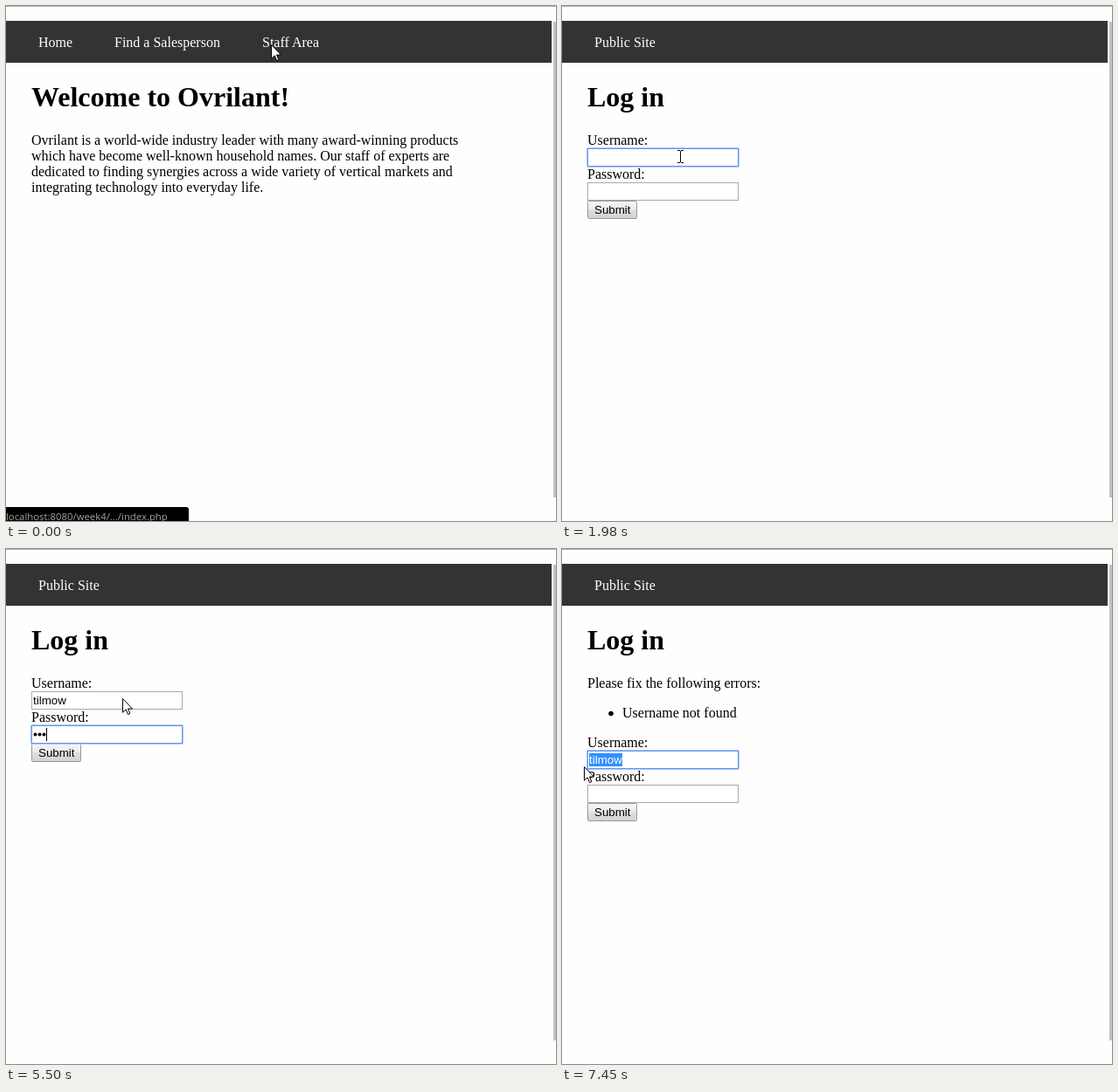
An HTML page that plays this animation: 629 by 590 pixels, repeating every 8000 ms.

```html
<!DOCTYPE html>
<html lang="en">
<head>
<meta charset="utf-8">
<title>Log in</title>
<style>
  html, body { margin: 0; width: 100%; height: 100%; overflow: hidden; background: #fefefe; }
  svg { display: block; width: 629px; height: 590px; }
  text { font: 16px "Liberation Serif", serif; white-space: pre; }
  .title { font-size: 32px; font-weight: bold; }
  .nav text { fill: #fff; }
  .ui { font: 13.33px "Liberation Sans", sans-serif; }
  .bubble { font: 11.35px "Open Sans", sans-serif; fill: #a2a2a2; }
  .field { fill: #fff; stroke: #a9a9a9; }
  .ring { fill: none; stroke: #a9c6f7; }
  .ring + .ring { stroke: #6496e8; }
</style>
</head>
<body>
<svg viewBox="0 0 629 590">
  <defs>
    <linearGradient id="face" x2="0" y2="1">
      <stop offset="0" stop-color="#f5f5f5"/>
      <stop offset=".45" stop-color="#ebebeb"/>
      <stop offset=".5" stop-color="#dfdfdf"/>
      <stop offset="1" stop-color="#d2d2d2"/>
    </linearGradient>
  </defs>
  <rect width="629" height="590" fill="#fefefe"/>
  <rect width="629" height="1" fill="#b0b0b0"/>
  <rect y="17" width="624" height="48" fill="#333"/>
  <rect x="626" y="18" width="3" height="545" fill="#c1c1c1"/>

  <g id="home">
    <g class="nav">
      <text x="37" y="47">Home</text>
      <text x="124" y="47">Find a Salesperson</text>
      <text x="293" y="47">Staff Area</text>
    </g>
    <text class="title" x="29" y="115">Welcome to Ovrilant!</text>
    <text x="29" y="159">Ovrilant is a world-wide industry leader with many award-winning products</text>
    <text x="29" y="177">which have become well-known household names. Our staff of experts are</text>
    <text x="29" y="195">dedicated to finding synergies across a wide variety of vertical markets and</text>
    <text x="29" y="213">integrating technology into everyday life.</text>
  </g>

  <g id="login">
    <g class="nav"><text x="37" y="47">Public Site</text></g>
    <text class="title" x="29" y="115">Log in</text>
    <g id="errors">
      <text x="29" y="159">Please fix the following errors:</text>
      <circle cx="56" cy="188.5" r="2.8"/>
      <text x="69" y="193">Username not found</text>
    </g>
    <g id="form">
      <text x="29" y="159">Username:</text>
      <rect class="field" x="29.5" y="163.5" width="172" height="20"/>
      <text x="29" y="198">Password:</text>
      <rect class="field" x="29.5" y="202.5" width="172" height="20"/>
      <rect x="29.5" y="223.5" width="56" height="20" rx="1" fill="url(#face)" stroke="#999"/>
      <text class="ui" x="37" y="238">Submit</text>
      <g id="focus">
        <rect class="ring" x="28.5" y="162.5" width="174" height="22" rx="1.5"/>
        <rect class="ring" x="29.5" y="163.5" width="172" height="20"/>
      </g>
      <rect id="selection" x="31" y="166" height="15" fill="#3390ff"/>
      <text class="ui" x="31" y="178"><tspan id="plain"></tspan><tspan id="picked" fill="#fff"></tspan></text>
      <g id="dots">
        <circle cx="33.5" cy="212.5" r="2"/>
        <circle cx="38.5" cy="212.5" r="2"/>
        <circle cx="43.5" cy="212.5" r="2"/>
      </g>
      <rect id="caret" width="1" height="15"/>
    </g>
  </g>

  <g id="bubble">
    <path d="M0 574H206Q209 574 209 577V590H0Z"/>
    <text id="status" class="bubble" x="0" y="589"></text>
  </g>

  <path id="arrow" d="M.5 .5V16.2L4.2 12.8 6.6 18.5 8.9 17.5 6.5 12H11.5Z" fill="#fff" stroke="#000"/>
  <path id="beam" d="M-3 -6.5H0M1 -6.5H4M.5 -6V7M-3 7.5H0M1 7.5H4" fill="none" stroke="#000"/>
</svg>
<script>
const LOOP = 8000;
const NAME = "tilmow";
const FIELD_X = 31;
const FIELD_GAP = 39;
const ERROR_SHIFT = 68;
const el = id => document.getElementById(id);

const start = {
  page: "home", status: "localhost:8080/week4/.../index.php", errors: false,
  pointer: "arrow", at: [303, 44], focus: null, caret: false,
  typed: 0, dots: 0, selectedFrom: NAME.length
};

// Each entry overrides part of the state from its time onward.
const events = [
  [240, { page: "login", at: [283, 52] }],
  [360, { status: "", at: [263, 61] }],
  [510, { at: [248, 69] }],
  [790, { at: [207, 103] }],
  [920, { at: [160, 140] }],
  [1050, { at: [135, 159] }],
  [1190, { pointer: "beam", at: [133, 171] }],
  [1320, { at: [130, 173] }],
  [1440, { focus: "user", caret: true }],
  [1580, { at: [135, 172] }],
  [1980, { caret: false }],
  [2530, { caret: true }],
  [2940, { typed: 1 }],
  [3080, { typed: 2 }],
  [3210, { typed: 3 }],
  [3340, { typed: 4 }],
  [3470, { typed: 5 }],
  [3610, { typed: 6 }],
  [3760, { focus: "password" }],
  [4280, { caret: false }],
  [4810, { caret: true }],
  [4940, { dots: 1 }],
  [5100, { dots: 2 }],
  [5230, { dots: 3 }],
  [5500, { pointer: "arrow", at: [133, 171] }],
  [5620, { status: "Waiting for localhost..." }],
  [5870, { errors: true, focus: null, caret: false, dots: 0 }],
  [6010, { status: "", at: [131, 178] }],
  [6140, { at: [124, 196] }],
  [6280, { at: [111, 232] }],
  [6400, { at: [103, 256] }],
  [6800, { at: [102, 240] }],
  [6940, { pointer: "beam", at: [92, 241] }],
  [7060, { focus: "user", caret: true, at: [72, 242] }],
  [7180, { caret: false, selectedFrom: 3, at: [46, 242] }],
  [7330, { pointer: "arrow", selectedFrom: 0, at: [16, 248] }],
  [7450, { at: [25, 249] }]
];

function stateAt(time) {
  const past = events.filter(([when]) => when <= time).map(([, change]) => change);
  return Object.assign({}, start, ...past);
}

const show = (id, visible) => el(id).setAttribute("display", visible ? "inline" : "none");
const move = (id, x, y) => el(id).setAttribute("transform", `translate(${x} ${y})`);

function render(time) {
  const s = stateAt(time);
  const inPassword = s.focus === "password";
  const focusY = inPassword ? FIELD_GAP : 0;

  show("home", s.page === "home");
  show("login", s.page === "login");
  show("errors", s.errors);
  show("bubble", s.status);
  el("status").textContent = s.status;
  move("form", 0, s.errors ? ERROR_SHIFT : 0);
  show("focus", s.focus);
  move("focus", 0, focusY);

  const plain = el("plain"), picked = el("picked");
  plain.textContent = NAME.slice(0, Math.min(s.typed, s.selectedFrom));
  picked.textContent = NAME.slice(s.selectedFrom, s.typed);
  const plainWidth = plain.textContent ? plain.getComputedTextLength() : 0;
  const pickedWidth = picked.textContent ? picked.getComputedTextLength() : 0;
  move("selection", Math.round(plainWidth), 0);
  el("selection").setAttribute("width", Math.round(pickedWidth));

  [...el("dots").children].forEach((dot, i) =>
    dot.setAttribute("display", i < s.dots ? "inline" : "none"));

  show("caret", s.caret);
  const caretX = FIELD_X + Math.floor(inPassword ? s.dots * 5 : plainWidth);
  move("caret", caretX, 166 + focusY);

  for (const shape of ["arrow", "beam"]) {
    show(shape, s.pointer === shape);
    move(shape, ...s.at);
  }
}

let origin;
function tick(now) {
  origin ??= now;
  render((now - origin) % LOOP);
  requestAnimationFrame(tick);
}
render(0);
requestAnimationFrame(tick);
</script>
</body>
</html>
```
